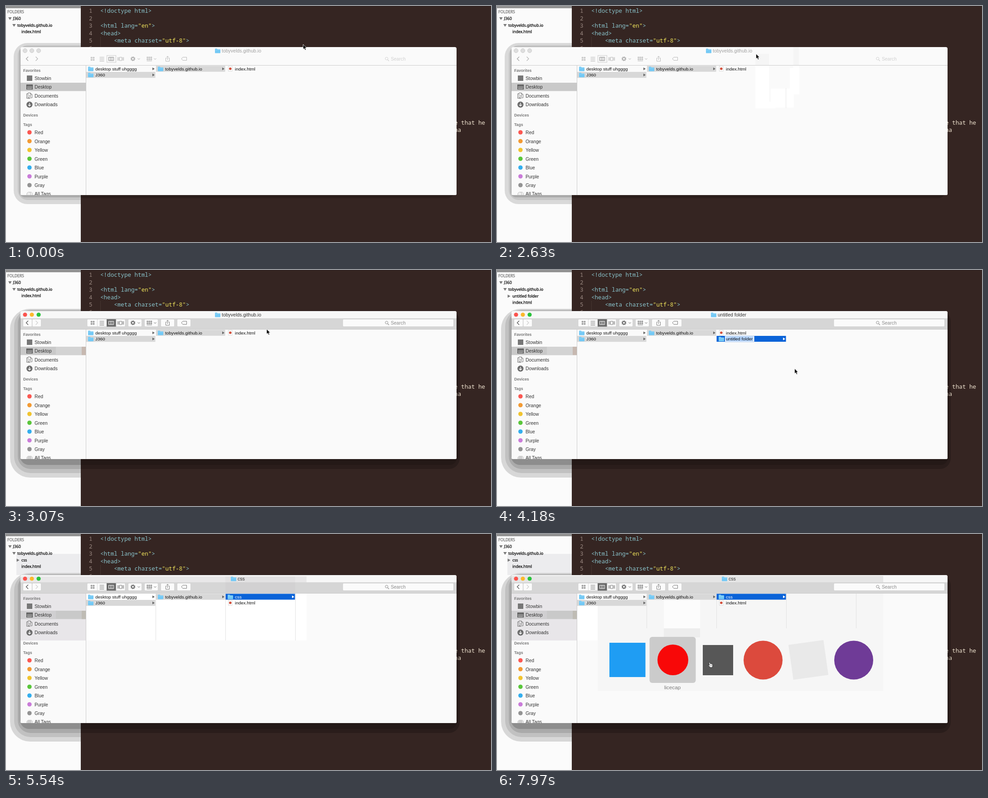
An HTML page that plays this animation: 1070x523 px, repeating every 8 s.

```html
<!DOCTYPE html>
<html lang="en">
<head>
<meta charset="utf-8">
<title>New folder</title>
<style>
html, body { margin: 0; width: 100%; height: 100%; overflow: hidden; }
svg { display: block; width: 1070px; height: 523px; }
text { font-family: "Liberation Sans", Arial, sans-serif; white-space: pre; }
.code { font-family: "Noto Sans Mono", monospace; }
.tree { font-family: "Noto Sans", sans-serif; stroke: currentColor; stroke-width: .25px; }
.bold { font-weight: bold; }
</style>
</head>
<body>
<svg id="stage" viewBox="0 0 1070 523"></svg>
<style id="timing"></style>
<script>
const LOOP = 8000;
const rules = new Map();
const percent = ms => (ms / LOOP * 100).toFixed(4) + '%';

// Drawing helpers
const rect = (x, y, w, h, fill, extra = '') =>
  `<rect x="${x}" y="${y}" width="${w}" height="${h}" fill="${fill}" ${extra}/>`;
const box = (x1, y1, x2, y2, fill, extra) => rect(x1, y1, x2 - x1, y2 - y1, fill, extra);
const circle = (x, y, r, fill, extra = '') =>
  `<circle cx="${x}" cy="${y}" r="${r}" fill="${fill}" ${extra}/>`;
const fill = (d, color, extra = '') => `<path d="${d}" fill="${color}" ${extra}/>`;
const line = (d, color, width = 1, extra = '') =>
  `<path d="${d}" fill="none" stroke="${color}" stroke-width="${width}" ${extra}/>`;
const text = (x, y, size, color, words, extra = '') =>
  `<text x="${x}" y="${y}" font-size="${size}" fill="${color}" ${extra}>${words}</text>`;

// Timing helpers: hard cuts only
const during = (from, to, body) => {
  const name = `show${from}-${to}`;
  rules.set(name, `0%{opacity:${from ? 0 : 1}} ${percent(from)}{opacity:1} ${percent(to)}{opacity:0}`);
  return `<g style="animation:${name} ${LOOP}ms step-end infinite">${body}</g>`;
};
const since = (from, body) => during(from, LOOP, body);
const jump = (name, stops, body) => {
  rules.set(name, stops.map(([ms, x, y]) =>
    `${percent(ms)}{transform:translate(${x}px,${y}px)}`).join(' '));
  return `<g style="animation:${name} ${LOOP}ms step-end infinite">${body}</g>`;
};

const ACTIVE = 3070, CREATED = 4030, TYPED = 4360, NAMED = 5100, LISTED = 5250,
      SORTED = 5540, SWITCHER = 7640;
const SITE = 'tobyvelds.github.io';
const EDITOR_LEFT = 165, RIGHT = 994;

// Code editor behind the window
const codeLine = (n, x, html) => {
  const y = 15 + (n - 1) * 16.5;
  return text(183, y, 12.6, '#9a8880', n, 'class="code"') +
    text(x, y, 12.6, '#8ac4cc', html, 'class="code"');
};
const quoted = s => `<tspan fill="#f1e55c">"${s}"</tspan>`;
const editor = () =>
  box(EDITOR_LEFT, 0, 1070, 523, '#352522') + box(EDITOR_LEFT, 0, 1070, 1, '#281b1a') +
  line('M208.5 69V91', '#57463f', 1, 'stroke-dasharray="1 1"') +
  codeLine(1, 208, '&lt;!doctype html&gt;') + codeLine(2, 208, '') +
  codeLine(3, 208, `&lt;html lang=${quoted('en')}&gt;`) +
  codeLine(4, 208, '&lt;head&gt;') +
  codeLine(5, 238.2, `&lt;meta charset=${quoted('utf-8')}&gt;`) + codeLine(6, 208, '') +
  text(989, 262.5, 12.6, '#f0e4d0', 'e that he', 'class="code"') +
  text(989, 279, 12.6, '#f0e4d0', 'na', 'class="code"');

const treeText = (x, y, words, color = '#000') =>
  text(x, y, 8.6, color, words, `class="tree" color="${color}"`);
const openMark = (x, y) => fill(`M${x} ${y}h7.5l-3.75 6z`, '#777');
const tree = () =>
  box(0, 0, EDITOR_LEFT, 523, '#fbfbfb') + box(0, 0, EDITOR_LEFT, 5, '#929292') +
  since(TYPED, box(23, 54, EDITOR_LEFT, 91, '#eeeeef')) +
  since(5390, box(23, 44, EDITOR_LEFT, 91, '#ececee')) +
  treeText(3, 16, 'FOLDERS', '#6c6c6c') +
  openMark(5, 25) + treeText(15.5, 31, 'J360') +
  openMark(14, 40) + treeText(25, 46, SITE) +
  during(0, CREATED, treeText(34, 60, 'index.html')) +
  since(CREATED, treeText(34, 75, 'index.html')) +
  during(CREATED, LISTED, treeText(34, 61, 'untitled folder')) +
  since(LISTED, treeText(34, 61, 'css')) +
  since(4180, fill('M23.5 54.5v7l6-3.5z', '#777'));

// Stepped window shadow: [left, top, bottom, radius, color] and [right, top, bottom, radius, opacity]
const shadow = (light, dark) =>
  `<g clip-path="url(#leftSide)">${light.map(([x, y, b, r, c]) =>
    box(x, y, 1020, b, c, `rx="${r}"`)).join('')}</g>` +
  `<g clip-path="url(#rightSide)">${dark.map(([x, y, b, r, a]) =>
    box(40, y, x, b, '#000', `rx="${r}" opacity="${a}"`)).join('')}</g>`;
const shadows = () =>
  during(0, ACTIVE, shadow(
    [[17, 82, 439, 30, '#d9d9d9'], [26, 87, 430, 22, '#c6c6c6'], [30, 90, 424, 12, '#aaa']],
    [[988, 91, 426, 14, .18]])) +
  since(ACTIVE, shadow(
    [[9, 86, 460, 44, '#d7d7d7'], [18, 88, 450, 36, '#c1c1c1'],
     [26, 90, 441, 28, '#aaa'], [31, 91, 432, 20, '#8d8d8d']],
    [[1001, 90, 441, 24, .2], [996, 91, 432, 18, .15]]));

// Toolbar
const folder = (x, y) =>
  fill(`M${x} ${y + 1}q0-1 1-1h3.5l1.3 1.4h5.2q1 0 1 1v6.6q0 1-1 1h-10q-1 0-1-1z`, '#74c9f5') +
  line(`M${x + .5} ${y + 2.8}h11`, '#a4def9', .8);
const chevron = x => line(`M${x} 116l2.5 2.5 2.5-2.5`, 'currentColor', 1);
const toolIcons = picked => {
  const c = 'currentColor';
  const dots = (x, y, cols, size, gap) => Array.from({ length: cols * 2 }, (_, i) =>
    rect(x + i % cols * gap, y + Math.floor(i / cols) * gap, size, size, 'none',
      `stroke="${c}" stroke-width=".9"`)).join('');
  return dots(187.5, 113.5, 2, 2.4, 4.7) +
    line('M206.5 113.5h10M206.5 116.5h10M206.5 119.5h10M206.5 122.5h10', c, .9) +
    line('M226.5 113.5h11v7.5h-11zM230.2 113.5v7.5M233.8 113.5v7.5', picked, 1) +
    line('M246.5 113.5v7.5M248.5 113.5v7.5M250.5 113.5h5v7.5h-5zM257.5 113.5v7.5M259.5 113.5v7.5', c, .9) +
    circle(280, 117, 3, 'none', `stroke="${c}" stroke-width="2"`) +
    circle(280, 117, 4.6, 'none', `stroke="${c}" stroke-width="1.4" stroke-dasharray="1.8 1.81"`) +
    chevron(290.5) + dots(311, 113, 3, 2.2, 4.2) +
    line('M310.5 121.8h11.5', c, .9) + chevron(326.5) +
    line('M354.5 115.5h-2v7h8v-7h-2M356.5 119.5v-8M354 113.5l2.5-2.5 2.5 2.5', c, .9) +
    line('M390 113.5h8.5v7H390l-3-3.5z', c, .9);
};
const lights = (colors, extra) =>
  colors.map((c, i) => circle(42 + 15 * i, 99, 4.6, c, extra)).join('');
const search = color =>
  circle(839.7, 116.5, 3, 'none', `stroke="${color}"`) +
  line('M842 119l3 3', color, 1.1) + text(849, 121, 10.3, color, 'Search');
const arrows = (back, forward) =>
  line('M49 112.5l-4.5 4.5 4.5 4.5', back, 1.3) + line('M65.5 112.5l4.5 4.5-4.5 4.5', forward, 1.3);

const idleBar = () =>
  lights(['#dedede', '#dedede', '#dedede'], 'stroke="#cecece"') +
  arrows('#a5a5a5', '#b5b5b5') +
  rect(222.5, 109.5, 20, 15.5, '#f7f7f7', 'stroke="#cfcfcf"') +
  `<g color="#b0b0b0">${toolIcons('#8f8f8f')}</g>` + search('#d0d0d0');
const button = (x1, x2) =>
  box(x1, 109, x2, 125.5, '#fbfbfb', 'rx="2" stroke="#c6c6c6" stroke-width=".6"');
const activeBar = () =>
  box(32, 107, RIGHT, 131.5, '#d6d6d6') + box(32, 91, RIGHT, 107, '#f7f7f7') +
  during(NAMED, LISTED, box(472, 94, 568, 106, '#e9e8e9') + box(472, 106, 552, 131, '#d2d1d2')) +
  during(LISTED, SWITCHER, box(32, 94, 663, 107, '#e8e7e8')) +
  during(SORTED, SWITCHER, box(484, 94, 638, 107, '#e2e1e2') + box(484, 107, 638, 131, '#d2d1d2')) +
  since(SWITCHER, box(32, 93, 852, 107, '#e5e5e5')) +
  lights(['#fb534d', '#fcb82c', '#2bc33d']) +
  button(37.5, 57.3) + button(58, 77.5) + button(179, 263) + button(269.5, 299.5) +
  button(305.5, 335.5) + button(341.5, 371.5) + button(377.5, 407.5) + button(743, 987.5) +
  line('M201.5 109v16M243 109v16', '#d2d2d2', .8) + box(222, 109, 242.5, 125.5, '#6a6a6a') +
  arrows('#555', '#cfcfcf') + `<g color="#6f6f6f">${toolIcons('#fff')}</g>` + search('#8c8c8c');

const heading = (x, words, color = '#333') => folder(x, 94.5) + text(x + 15, 103, 10.5, color, words);

// Window sidebar
const sidebar = () => {
  const label = (y, words) => text(63, y, 10.3, '#333', words);
  const section = (y, words) => text(38, y, 8.6, '#777', words, 'class="bold"');
  const gray = '#777';
  const tags = { Red: '#fb5751', Orange: '#f39a33', Yellow: '#f1c42f', Green: '#5ac63b',
    Blue: '#33aeee', Purple: '#ca7cd9', Gray: '#939393' };
  return during(TYPED, LISTED, box(32, 132, 176, 161, '#ededed')) +
    since(LISTED, box(32, 132, 176, 236, '#e8e6e9')) +
    box(32, 170, 176, 188.5, '#c9c9c9') +
    during(ACTIVE, LISTED, box(110, 170, 167, 188.5, '#d3d3d3') + box(167, 170, 176, 188.5, '#c7b8b0')) +
    since(LISTED, box(32, 170, 110, 188.5, '#d0cfd1') + box(167, 170, 176, 188.5, '#bfbcb4')) +
    section(146, 'Favorites') + section(245, 'Devices') + section(266, 'Tags') +
    rect(46, 154, 12, 12, gray) + label(164, 'Stowbin') +
    rect(45.5, 174.5, 13, 10, '#8a8a8a', 'stroke="#4c4c4c"') +
    line('M46 176.5h12', '#444', 1) + line('M47 183.2h10', '#ddd', 1, 'stroke-dasharray="1.5 1"') +
    label(183, 'Desktop') +
    line('M48.5 194.5h-3v10h7v-1M48.5 192.5h5l4 3.5v7.5h-9zM53.5 192.5v3.5h4M51 198.5h4M51 200.5h4', gray) +
    label(203, 'Documents') + circle(51.8, 218.5, 6.7, '#6c6c6c') +
    line('M51.8 214.5v7M48.8 218.8l3 3 3-3', '#fff', 1.4) + label(222, 'Downloads') +
    Object.entries(tags).map(([name, color], i) =>
      circle(51.8, 280 + 19.5 * i, 4.8, color) + label(284 + 19.5 * i, name)).join('') +
    circle(54, 417, 4.6, '#fafafa', 'stroke="#aaa" stroke-width=".8"') +
    circle(50.5, 417, 4.6, '#f0f0f0', 'stroke="#aaa" stroke-width=".8"') +
    since(ACTIVE, circle(52, 417, 4.8, '#d0d0d0')) + label(420, 'All Tags') +
    line('M176.5 132V419', '#cacaca');
};

// Columns
const rowTop = n => 132.5 + 13.5 * n;
const marker = (x, n, color) => fill(`M${x} ${rowTop(n) + 3.7}v6l5-3z`, color);
const name = (x, n, words, color = '#111') => text(x, rowTop(n) + 10.2, 9.9, color, words);
const folderRow = (x, n, words) =>
  folder(x + 4.5, rowTop(n) + 2) + name(x + 20.5, n, words) + marker(x + 146.5, n, '#666');
const pageRow = n => {
  const y = rowTop(n);
  return rect(490.5, y + 1, 8.5, 11, '#fff', 'stroke="#ccc" stroke-width=".7"') +
    circle(494.8, y + 6.5, 2.8, '#d2503c') + name(505, n, 'index.html');
};
const blueRow = n => box(484.5, rowTop(n), 637.5, rowTop(n + 1) - .5, '#0a63d8') +
  folder(489, rowTop(n) + 2) + marker(631, n, '#fff');
const field = (words, right, back = '#fff') =>
  box(503, 146.2, right, 159.2, '#fff', 'stroke="#8fb4e6" stroke-width=".8"') +
  box(505, 147.5, right - 2, 158, back) + name(505, 1, words);

// Brightened area that each pointer move leaves behind
const trail = (from, x1, y1, x2, y2) => during(from, ACTIVE,
  (y1 < 131 ? box(x1, Math.max(y1, 91), x2, 131, '#f5f5f5') : '') +
  box(x1, Math.max(y1, 132), x2, y2, '#fff'));

const dividers = (xs, bottom) => line(xs.map(x => `M${x}.5 132V${bottom}`).join(''), '#e1e1e1');
const columns = () =>
  trail(150, 654, 85, 666, 151) + trail(390, 646, 137, 667, 196) +
  trail(540, 604, 183, 655, 225) + trail(690, 590, 212, 614, 227) +
  trail(2630, 570, 106, 600, 227) +
  during(690, ACTIVE, line('M637.5 182V226', '#e6e6e6')) +
  during(TYPED, LISTED, box(177, 132, 472, 161, '#f1f1f1') + box(472, 132, 568, 161, '#fff')) +
  since(LISTED, box(177, 132, 663, 236, '#fff')) +
  during(LISTED, SWITCHER, dividers([330, 484, 638], 236)) +
  since(SWITCHER, box(222, 132, 852, 348, '#f6f6f6')) +
  since(7790, box(368, 132, 448, 209, '#fcfcfc') + box(368, 209, 448, 229, '#ededed')) +
  since(SWITCHER, dividers([330, 484, 638, 792], 209)) +
  box(177, 146, 329.5, 159.2, '#d8d8d8') + box(331, 132.5, 483.5, 145.7, '#d8d8d8') +
  folderRow(176.5, 0, 'desktop stuff uhgggg') + folderRow(176.5, 1, 'J360') +
  folderRow(330.5, 0, SITE) +
  during(0, SORTED, pageRow(0)) + since(SORTED, pageRow(1)) +
  during(CREATED, SORTED, blueRow(1)) +
  during(CREATED, TYPED, field('untitled folder', 567.5, '#b4d5fe')) +
  during(TYPED, 4510, field('c', 513)) + during(4510, 4660, field('cs', 518)) +
  during(4660, NAMED, field('css', 522.5)) +
  during(NAMED, SORTED, name(505, 1, 'css', '#fff')) +
  since(SORTED, blueRow(0) + name(505, 0, 'css', '#fff'));

// App switcher with plain stand-in icons
const switcher = () =>
  box(336.5, 228, 438.5, 330, '#cbcbcb', 'rx="6"') +
  rect(248, 241, 79.5, 76, '#1f9df3') + circle(388, 279, 34, '#f80808') +
  rect(454, 246, 67, 67, '#575757') + circle(587, 279.5, 43, '#dc4a3d') +
  rect(648, 240, 78, 78, '#e9e9e9', 'transform="rotate(-8 687 279)"') +
  circle(787, 279.5, 43, '#6f3b97') +
  text(387, 344, 11.8, '#7c7c7c', 'licecap', 'text-anchor="middle"');

const panel = () => {
  const shape = `M32 95q0-4 4-4H${RIGHT - 4}q4 0 4 4V416.5q0 2.5-2.5 2.5H34.5q-2.5 0-2.5-2.5z`;
  return fill(shape, '#fafafa') + `<g clip-path="url(#panel)">` +
    during(0, ACTIVE, idleBar() + heading(461, SITE, '#a0a0a0')) + since(ACTIVE, activeBar()) +
    during(ACTIVE, CREATED, heading(461, SITE)) +
    during(CREATED, NAMED, heading(472, 'untitled folder')) + since(NAMED, heading(496, 'css')) +
    columns() + sidebar() + line(`M32 131.5H${RIGHT}`, '#cbcbcb') + since(SWITCHER, switcher()) +
    `</g><clipPath id="panel"><path d="${shape}"/></clipPath>`;
};

const pointer = () =>
  during(0, LISTED, jump('arrow', [
    [0, 655, 85], [150, 655, 137.5], [390, 647, 183], [540, 605, 212], [690, 591, 213.5],
    [2630, 571, 106], [2780, 574.5, 131], [2920, 574.5, 131.5], [3070, 574.5, 131],
    [3220, 591.5, 179.5], [3430, 656, 218.5]
  ], fill('M.5 0v11l2.5-2.3 1.8 4.1 2-.9-1.8-3.9h3.4z', '#000', 'stroke="#fff" stroke-width=".8"'))) +
  since(SWITCHER, jump('hand', [[0, 436, 82.7], [SWITCHER, 436, 82.7], [7790, 369, 235.5], [7970, 465.3, 283.5]],
    fill('M2.5 1.2q1.2-.9 1.9.5l1.2 2.5 3-.2q1.6.3 1.7 2.2l.2 3-1 3H5L1 7.6q-.4-1.4 1-1.2l1.6 1L2.2 2.6z',
      '#fff', 'stroke="#111" stroke-width=".9"') + line('M6 6.5v2.5M8 6.5v2.5', '#111', .6)));

document.getElementById('stage').innerHTML =
  `<clipPath id="leftSide">${box(0, 0, EDITOR_LEFT, 523, '#000')}</clipPath>` +
  `<clipPath id="rightSide">${box(EDITOR_LEFT, 0, 1070, 523, '#000')}</clipPath>` +
  editor() + tree() + shadows() + panel() + pointer();
document.getElementById('timing').textContent =
  [...rules].map(([name, frames]) => `@keyframes ${name}{${frames}}`).join('\n');
</script>
</body>
</html>
```
